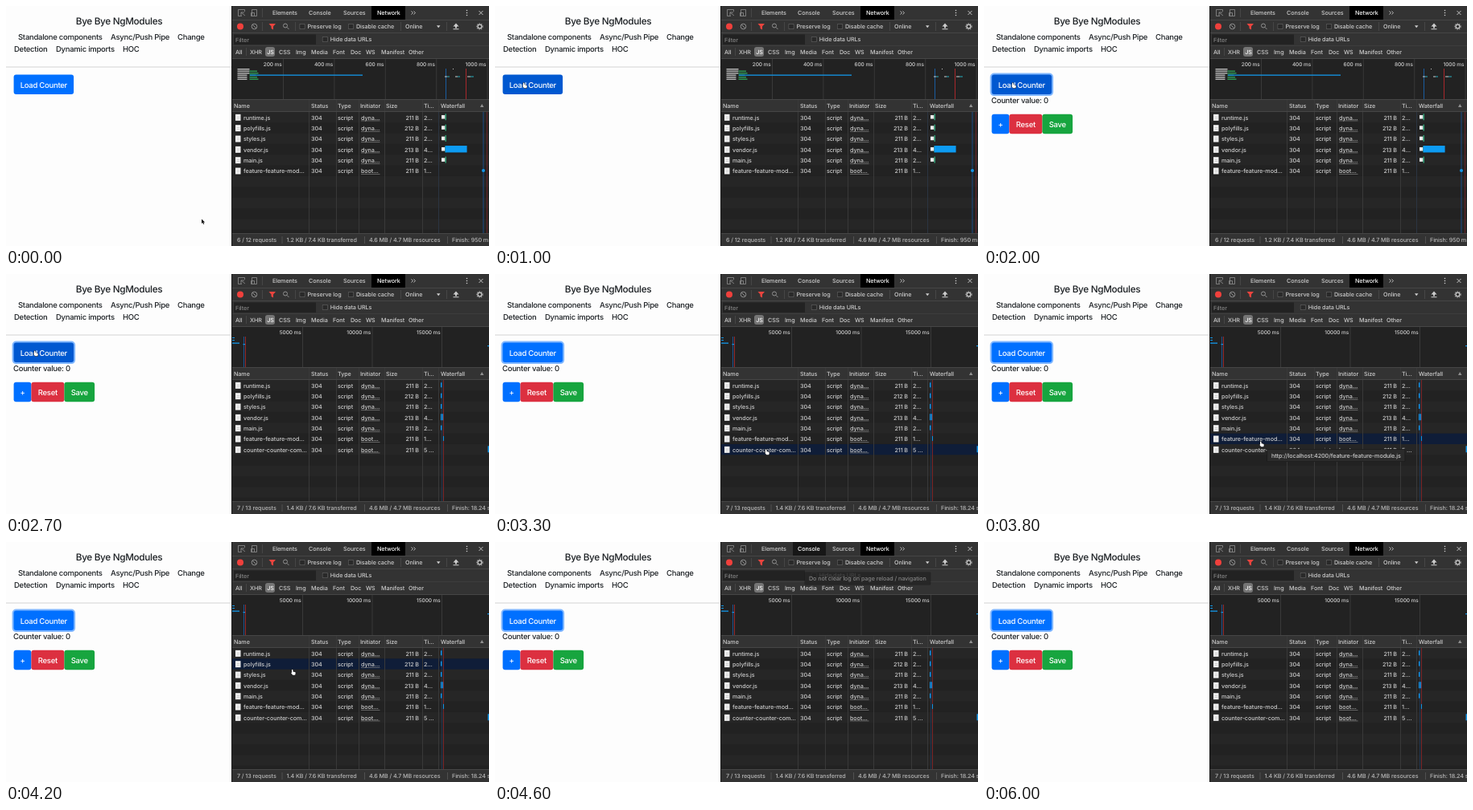
Animation of 600x299 px, one loop 6100 ms. Source, as an HTML page with a canvas:

```html
<!DOCTYPE html>
<html lang="en">
<head>
<meta charset="utf-8">
<title>Bye Bye NgModules</title>
<style>
html, body { margin: 0; width: 100%; height: 100%; overflow: hidden; background: #fdfdfd; }
canvas { display: block; width: 600px; height: 299px; }
</style>
</head>
<body>
<canvas id="stage" width="600" height="299"></canvas>
<script>
const ctx = document.getElementById('stage').getContext('2d');
const LOOP = 6100, STEP = 100;
const LIGHT = '#cdcdcd', DIM = '#909090', LINE = '#464646', GRID = '#393939', BAR = '#333', PANE = '#222';
const BLUE = '#0070ff', PRESSED = '#0058d0', CYAN = '#1296e8', RED = '#a8272b';
const SMALL = 7.2;

const HAND = new Path2D('M2 .5Q3 .5 3 1.4V3.6L6 4.3Q7 4.6 6.8 6L6.2 8.6H2.6L.4 6Q0 5 1.2 5.2V1.3Q1.2 .5 2 .5Z');
const ARROW = new Path2D('M0 0V6.5L1.6 5 2.7 7.5 3.8 7 2.7 4.7H4.8Z');

// time, x, y of the pointer tip
const POINTER = [
  [0, 243, 265.5], [700, 36, 95], [2700, 36, 95], [3300, 337, 218], [3500, 338, 218],
  [3700, 344, 208], [3800, 344, 208], [4000, 344, 218], [4600, 390, -12], [LOOP, 390, -12]
];
// start, end, x, y, label
const TOOLTIPS = [
  [3500, 3700, 345, 228, 'http://localhost:4200/counter-counter-component-module.js'],
  [3700, 4000, 352, 218.5, 'http://localhost:4200/feature-feature-module.js'],
  [4000, 4200, 352, 228, 'http://localhost:4200/counter-counter-component-module.js'],
  [4400, 4800, 385, 38, 'Do not clear log on page reload / navigation']
];
const FILES = ['runtime.js', 'polyfills.js', 'styles.js', 'vendor.js', 'main.js', 'feature-feature-mod…', 'counter-counter-com…'];
const ROW_TOP = 132, ROW_H = 13.33;

function rect(x, y, w, h, color) {
  ctx.fillStyle = color;
  ctx.fillRect(x, y, w, h);
}

function round(x, y, w, h, r, color) {
  ctx.fillStyle = color;
  ctx.beginPath();
  ctx.roundRect(x, y, w, h, r);
  ctx.fill();
}

function setFont(size) {
  ctx.font = `500 ${size}px Inter, sans-serif`;
  ctx.textRendering = 'geometricPrecision';
  ctx.letterSpacing = `${size * (size > 9 ? -0.028 : -0.012)}px`;
}

// y is the vertical middle of the capitals
function text(s, x, y, color = LIGHT, size = SMALL, align = 'left') {
  setFont(size);
  ctx.textAlign = align;
  ctx.fillStyle = color;
  ctx.fillText(s, x, y + size * 0.36 + 0.3);
}

function stroke(d, color = DIM, width = 1) {
  ctx.strokeStyle = color;
  ctx.lineWidth = width;
  ctx.stroke(new Path2D(d));
}

function fill(d, color = DIM) {
  ctx.fillStyle = color;
  ctx.fill(new Path2D(d));
}

function circle(x, y, r, color, width) {
  ctx.beginPath();
  ctx.arc(x, y, r, 0, 7);
  ctx.lineWidth = width || 1;
  ctx.strokeStyle = ctx.fillStyle = color;
  width ? ctx.stroke() : ctx.fill();
}

function checkbox(x, y, label) {
  round(x - 3.5, y - 3.5, 7, 7, 1, '#5a5a5a');
  round(x - 2.8, y - 2.8, 5.6, 5.6, 1, '#292929');
  text(label, x + 6.5, y);
}

function button(label, x, y, w, color) {
  round(x, y, w, 24.5, 3, color);
  text(label, x + w / 2, y + 12.3, '#fff', 9.5, 'center');
}

function tooltip(label, x, y, alpha) {
  ctx.globalAlpha = alpha;
  setFont(SMALL);
  const w = ctx.measureText(label).width + 10;
  round(x - 0.5, y - 0.5, w + 1, 16, 1, '#151515');
  rect(x, y, w, 15, '#2b2b2b');
  text(label, x + 5, y + 7.3);
  ctx.globalAlpha = 1;
}

function pointerAt(t) {
  const i = POINTER.findIndex(p => p[0] > t);
  const [t0, x0, y0] = POINTER[i - 1], [t1, x1, y1] = POINTER[i];
  const k = (t - t0) / (t1 - t0), e = k * k * (3 - 2 * k);
  return [x0 + (x1 - x0) * e, y0 + (y1 - y0) * e];
}

function drawPage(t, overButton) {
  rect(0, 0, 280, 299, '#fdfdfd');
  const ink = '#1c2024';
  text('Bye Bye NgModules', 140.5, 18, ink, 11.75, 'center');
  [['Standalone components', 15, 38], ['Async/Push Pipe', 130, 38], ['Change', 213, 38],
   ['Detection', 10, 53], ['Dynamic imports', 62, 53], ['HOC', 145, 53]]
    .forEach(([s, x, y]) => text(s, x, y, ink, 9.5));
  rect(0, 75.5, 280, 1, '#d4d4d4');
  if (t >= 1900) {
    ctx.globalAlpha = Math.min(1, (t - 1850) / 150);
    round(7.6, 83.6, 78.5, 28.5, 5, '#80b7ff');
    ctx.globalAlpha = 1;
  }
  button('Load Counter', 9.6, 85.6, 74.5, overButton ? PRESSED : BLUE);
  if (t < 2000) return;
  text('Counter value: 0', 9, 117.5, ink, 9.5);
  button('+', 9.6, 134.7, 21.8, BLUE);
  button('Reset', 31.4, 134.7, 41, '#dc3040');
  button('Save', 72.4, 134.7, 37.7, '#17a53f');
}

function drawToolbars(overConsole) {
  rect(280, 0, 320, 299, BAR);
  rect(280, 0, 1, 299, '#1a1a1a');

  stroke('M293 12.5H288.5V4.5H296.5V7M292 8L297 12M292 8V12M292 8H296', DIM, 0.8);
  stroke('M305.5 12.5V4.5H311.5V6M304.5 8.5H308.5V12.5H304.5ZM308.5 12.5H311.5V6', DIM, 0.8);
  rect(318, 3, 1, 11, LINE);
  if (overConsole) rect(370, 0, 41, 17, '#171717');
  rect(454, 0, 42, 17, '#000');
  text('Elements', 331, 8.5);
  text('Console', 376, 8.5, overConsole ? '#fff' : LIGHT);
  text('Sources', 419, 8.5);
  text('Network', 461, 8.5, '#fff');
  stroke('M503.5 6.5L505.5 8.5 503.5 10.5M506.5 6.5L508.5 8.5 506.5 10.5', LIGHT, 0.9);
  [5.5, 8.5, 11.5].forEach(y => circle(572.5, y, 0.8, LIGHT));
  stroke('M587.5 6L592.5 11M592.5 6L587.5 11', LIGHT, 0.9);
  rect(281, 17, 319, 1, LINE);

  circle(291, 25.5, 4, '#f0403c');
  circle(308.5, 25.5, 3.3, DIM, 1);
  stroke('M306.2 23.2L310.8 27.8');
  rect(318, 20, 1, 11, LINE);
  fill('M326.5 22H335L332 25.5V29.5L329.5 28V25.5Z', '#e8443e');
  circle(347, 24.5, 2.5, DIM, 1);
  stroke('M348.8 26.3L351.5 29');
  rect(359, 20, 1, 11, LINE);
  checkbox(368, 25.5, 'Preserve log');
  checkbox(428.5, 25.5, 'Disable cache');
  rect(490, 20, 1, 11, LINE);
  text('Online', 496, 25.5);
  fill('M535 24.2H539.5L537.2 27.3Z', LIGHT);
  rect(547, 20, 1, 11, LINE);
  fill('M559 21.5L562.5 25.5H560V27.5H558V25.5H555.5ZM555.5 28.3H562.5V29.3H555.5Z', LIGHT);
  ctx.setLineDash([1.5, 1.1]);
  circle(588.5, 25.5, 3.6, DIM, 1.4);
  ctx.setLineDash([]);
  circle(588.5, 25.5, 2.4, LIGHT, 1.2);
  rect(281, 33, 319, 1, LINE);

  rect(283, 35.5, 102, 12.5, PANE);
  text('Filter', 285, 42, '#858585');
  checkbox(396.3, 41.5, 'Hide data URLs');
  rect(281, 49, 319, 1, '#3d3d3d');

  round(322, 51, 12, 12, 3, '#757575');
  [['All', 285], ['XHR', 303], ['JS', 324.3], ['CSS', 339], ['Img', 360], ['Media', 379], ['Font', 406],
   ['Doc', 428], ['WS', 447], ['Manifest', 466], ['Other', 500]]
    .forEach(([s, x]) => text(s, x, 57, s === 'JS' ? '#fff' : LIGHT));
  rect(298, 52, 1, 10, LINE);
  rect(281, 65, 319, 1, LINE);
}

function drawOverview(loaded) {
  rect(281, 66, 319, 51, PANE);
  const [first, gap, unit, count] = loaded ? [368, 86.5, 5000, 3] : [344, 63.4, 200, 5];
  for (let i = 0; i < count; i++) {
    const x = first + gap * i;
    rect(x, 66, 1, 50, GRID);
    text(`${unit * (i + 1)} ms`, x - 1.3, 72, LIGHT, 6.5, 'right');
  }
  if (loaded) {
    rect(281, 79, 3, 1, CYAN);
    rect(281, 82, 3, 1, CYAN);
    rect(281, 85.5, 9, 1.3, CYAN);
    rect(295, 78, 1, 38, '#1a5590');
    rect(297, 78, 1, 38, '#962a2c');
    rect(294.5, 87, 2.5, 1.2, CYAN);
    rect(598, 89, 2, 1.2, CYAN);
  } else {
    for (let i = 0; i < 6; i++) {
      const y = 78 + i * 2.5;
      rect(287.5, y, 15 - (i > 2 ? 3 : 0), 1.4, '#bdbdbd');
      if (i) rect(302.5, y, 8 + i % 3 * 1.5, 1.4, '#2f9e58');
    }
    rect(303, 85.5, 140, 1.3, CYAN);
    rect(546, 78, 1, 38, '#1a5c9e');
    rect(571, 78, 1, 38, RED);
    rect(555, 78, 1, 1, LIGHT);
    [[545, 3], [558, 3], [573, 4]].forEach(([x, w]) => {
      rect(x, 87.5, w, 1, LIGHT);
      rect(x + w, 87.5, w, 1, '#27aebd');
    });
  }
  rect(281, 116, 319, 1, LINE);
}

function drawWaterfall(loaded) {
  const mid = i => ROW_TOP + ROW_H * (i + 0.5) - 0.4;
  if (loaded) {
    for (let i = 0; i < 5; i++) rect(540, mid(i) - (i === 3 ? 4 : 3), i === 3 ? 3 : 2, i === 3 ? 8 : 6, CYAN);
    rect(541, ROW_TOP, 0.7, 151, '#1d3f68');
    rect(543, ROW_TOP, 1, 151, '#7a2529');
    rect(543, mid(5) - 3, 1, 6, CYAN);
    rect(598.5, mid(6) - 4, 1.5, 8, CYAN);
    return;
  }
  rect(537, ROW_TOP, 1, 151, '#2b3542');
  rect(592.5, ROW_TOP, 1, 151, '#1b4d85');
  rect(597, ROW_TOP, 1, 151, '#6a2428');
  for (let i = 0; i < 5; i++) {
    rect(541, mid(i) - 2.3, 4.5, 4.6, '#eee');
    rect(545.5, mid(i) - 4, 1.5, 8, '#2e9b72');
  }
  rect(545.6, mid(3) - 4.2, 27, 8.4, '#0d9bf2');
  circle(593, mid(5), 2, CYAN);
}

function drawTable(loaded, hovered) {
  rect(281, ROW_TOP, 319, 151, PANE);
  for (let i = 0; i < 11; i += 2) rect(281, ROW_TOP + ROW_H * i, 319, ROW_H, '#262626');
  if (hovered >= 0) rect(281, ROW_TOP + ROW_H * hovered, 319, ROW_H, '#0f1d38');
  [376, 410, 438, 470, 517, 537].forEach(x => rect(x, 117, 1, 166, GRID));
  drawWaterfall(loaded);
  [['Name', 283], ['Status', 379], ['Type', 412], ['Initiator', 440], ['Size', 472], ['Ti…', 519], ['Waterfall', 540]]
    .forEach(([s, x]) => text(s, x, 123.8));
  fill('M589 126H593.5L591.2 122Z');
  rect(281, 131, 319, 1, LINE);

  FILES.slice(0, loaded ? 7 : 6).forEach((name, i) => {
    const y = ROW_TOP + ROW_H * (i + 0.5) + 0.2;
    rect(285, y - 4, 6.5, 8, '#f2f2f2');
    rect(286.3, y - 1, 4, 0.6, '#bbb');
    rect(286.3, y + 1, 4, 0.6, '#bbb');
    text(name, 295, y);
    text('304', 379, y);
    text('script', 412, y);
    text(i < 5 ? 'dyna…' : 'boot…', 441, y);
    rect(441, y + 3.8, 23.5, 0.6, '#909090');
    text(`${i === 1 ? 212 : i === 3 ? 213 : 211} B`, 513, y, LIGHT, SMALL, 'right');
    text(['2…', '2…', '2…', '4…', '2…', '1…', '5 …'][i], 519, y);
  });
}

function drawSummary(loaded) {
  rect(281, 283, 319, 16, BAR);
  rect(281, 283, 319, 1, LINE);
  const parts = loaded
    ? ['7 / 13 requests', '1.4 KB / 7.6 KB transferred', '4.6 MB / 4.7 MB resources', 'Finish: 18.24 s']
    : ['6 / 12 requests', '1.2 KB / 7.4 KB transferred', '4.6 MB / 4.7 MB resources', 'Finish: 950 ms'];
  parts.forEach((s, i) => {
    const x = [287, 348.5, 451, 554][i];
    text(s, x, 291.3, '#b8b8b8');
    if (i) rect(x - 6, 287, 1, 9, '#505050');
  });
}

function drawPointer(x, y, hand) {
  ctx.save();
  ctx.translate(hand ? x - 2 : x, y);
  ctx.scale(0.85, 0.85);
  ctx.lineJoin = 'round';
  ctx.lineWidth = 1;
  ctx.strokeStyle = hand ? '#000' : '#fff';
  ctx.fillStyle = hand ? '#fff' : '#000';
  const shape = hand ? HAND : ARROW;
  ctx.stroke(shape);
  ctx.fill(shape);
  ctx.restore();
}

function draw(t) {
  const [x, y] = pointerAt(t);
  const loaded = t >= 2200;
  const overButton = x > 10 && x < 84 && y > 86 && y < 110;
  const row = Math.floor((y - ROW_TOP) / ROW_H);
  const hovered = x > 281 && row >= 0 && row < 7 ? row : -1;

  drawPage(t, overButton);
  drawToolbars(t >= 4500 && t < 4700);
  drawOverview(loaded);
  drawTable(loaded, hovered);
  drawSummary(loaded);
  TOOLTIPS.forEach(([start, end, left, top, label]) => {
    const alpha = top < 50 ? Math.min(1, (end - t) / 350) : 1;
    if (t >= start && t < end) tooltip(label, left, top, alpha);
  });
  drawPointer(x, y, overButton || hovered >= 0);
}

function tick(now) {
  draw(Math.floor(now % LOOP / STEP) * STEP);
  requestAnimationFrame(tick);
}
requestAnimationFrame(tick);
</script>
</body>
</html>
```
